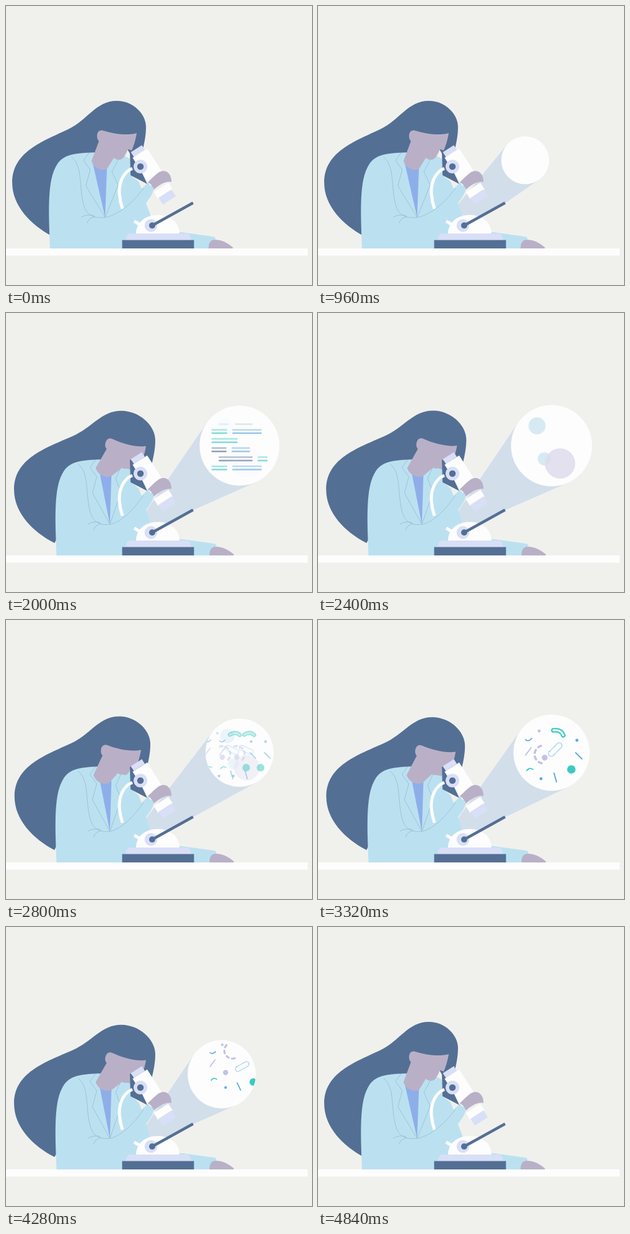
An HTML page with a canvas that plays this animation: 494x450 px, repeating every 5.04 s.

```html
<!DOCTYPE html>
<html lang="en">
<head>
<meta charset="utf-8">
<title>Microscope</title>
<style>
  html, body { margin: 0; width: 100%; height: 100%; overflow: hidden; background: #f0f1ed; }
  canvas { display: block; }
</style>
</head>
<body>
<canvas width="494" height="450"></canvas>
<script>
const ctx = document.querySelector('canvas').getContext('2d');
const LOOP = 5040, STEP = 40;
const C = {
  bg: '#f0f1ed', white: '#fdfdfd', hair: '#546f94', coat: '#bbe1f1', skin: '#b9b0c7', lilac: '#d8dff7',
  beam: '#d3deeb', shirt: '#8eaeea', seam: '#9cc3d5', teal: '#3bcac0', blue: '#5fabe0', purple: '#c2c2e8'
};

const clamp = (v, lo = 0, hi = 1) => Math.min(hi, Math.max(lo, v));
const ramp = (t, a, b) => { const p = clamp((t - a) / (b - a)); return p * p * (3 - 2 * p); };

// Monotone cubic interpolation through [time, value] keys.
function track(...keys) {
  const slope = i => keys[i] && keys[i + 1]
    ? (keys[i + 1][1] - keys[i][1]) / (keys[i + 1][0] - keys[i][0]) : 0;
  const tangent = i => {
    const a = slope(i - 1), b = slope(i);
    return a * b > 0 ? 2 * a * b / (a + b) : 0;
  };
  return t => {
    if (t <= keys[0][0]) return keys[0][1];
    const i = keys.findIndex((k, n) => keys[n + 1] && t < keys[n + 1][0]);
    if (i < 0) return keys[keys.length - 1][1];
    const [t0, v0] = keys[i], [t1, v1] = keys[i + 1];
    const d = t1 - t0, p = (t - t0) / d, q = 1 - p;
    return v0 * (1 + 2 * p) * q * q + v1 * p * p * (3 - 2 * p)
      + d * p * q * (tangent(i) * q - tangent(i + 1) * p);
  };
}

const lean = track([1120, 0], [1440, .2], [1920, 1], [4300, 1], [4840, 0]);
const nod = track([1120, 0], [1440, .56], [2000, 1], [2240, 1], [2800, .47], [3320, .75], [3800, 1], [4300, 1], [4840, 0]);
const travel = track([580, 0], [1120, .86], [1440, .98], [1600, 1], [3960, 1], [4280, .75], [4520, .41], [4780, 0]);
const radius = track([580, 0], [1120, 53], [1440, 61], [2000, 64.5], [2260, 67.5], [2800, 55], [3320, 61.5],
  [3640, 59], [3960, 60], [4280, 55], [4520, 25], [4780, 0]);

function fill(d, color) {
  ctx.fillStyle = color;
  ctx.fill(new Path2D(d));
}
function stroke(d, color, width, cap = 'butt') {
  ctx.strokeStyle = color;
  ctx.lineWidth = width;
  ctx.lineCap = cap;
  ctx.stroke(new Path2D(d));
}
function disc(x, y, r, color) {
  ctx.fillStyle = color;
  ctx.beginPath();
  ctx.arc(x, y, r, 0, 7);
  ctx.fill();
}
function box(x, y, w, h, color) {
  ctx.fillStyle = color;
  ctx.fillRect(x, y, w, h);
}
function placed(x, y, degrees, draw) {
  ctx.save();
  ctx.translate(x, y);
  ctx.rotate(degrees * Math.PI / 180);
  draw();
  ctx.restore();
}
function faded(alpha, draw) {
  if (alpha <= 0) return;
  ctx.save();
  ctx.globalAlpha *= alpha;
  draw();
  ctx.restore();
}
// Moves every coordinate pair of a path by shift(x, y).
const warp = (d, shift) => d.replace(/([\d.]+) ([\d.]+)/g, (m, x, y) => {
  const [dx, dy] = shift(+x, +y);
  return `${+x + dx} ${+y + dy}`;
});

function tangent(x, y, b, side) {
  const dx = b.x - x, dy = b.y - y, d = Math.hypot(dx, dy);
  const half = Math.asin(Math.min(1, b.r / d));
  const a = Math.atan2(dy, dx) + side * half, len = d * Math.cos(half);
  return `${x + Math.cos(a) * len} ${y + Math.sin(a) * len}`;
}

function drawBeam(b) {
  fill(`M226 320 L${tangent(226, 320, b, -1)} L${b.x} ${b.y} L${tangent(302, 318, b, 1)} L302 318 L240 351Z`, C.beam);
}

// Code rows as [start, end, color] dashes.
const rows = [
  [[-42, -4, C.teal]],
  [[-42, -21, C.hair], [-11, 15, C.blue]],
  [[-31, 19, C.hair], [29, 42, C.teal]],
  [[-42, -20, C.teal], [-10, 33, C.blue]],
  [[-31, -18, C.blue], [-6, 19, C.hair]]
];

function codeRows(t, scroll) {
  for (let i = -1; i < 20; i++) {
    const y = -21 + i * 14 - scroll;
    if (y > 43 || y < -48) continue;
    const typed = ramp(t, 1060 + i * 55, 1180 + i * 55);
    const row = i < 0 ? [[-42, -11, C.lilac]] : i < 5 ? rows[i] : rows[(i + 2) % 4];
    if (typed) faded(scroll ? clamp((y + 36) / 10) : 1, () => row.forEach(([a, b, color]) =>
      stroke(`M${a} ${y} H${a + (b - a) * typed}`, color, i < 0 ? 4 : 2.4, 'round')));
  }
}

function drawCode(t) {
  const scroll = Math.max(0, t - 1460) * .13;
  if (!scroll) return codeRows(t, 0);
  faded(.45, () => codeRows(t, scroll + 3.2));
  faded(.65, () => codeRows(t, scroll - 2));
}

function drawCells() {
  disc(-22, -30, 13, '#cfe6f3');
  disc(-11, 20, 10, '#cfe6f3');
  disc(13, 27, 23, '#dedbed');
}

function drawMicrobes(t, away) {
  const p = ramp(t, 3320, 4280), early = 1 - ramp(t, 2800, 3320);
  ctx.translate(84 * away, -72 * away);
  placed(11 + 12 * p, -33 - 12 * p, -25 * early, () => {
    stroke('M-8 -3 Q4 -5 8 5', C.teal, 7.5, 'round');
    stroke('M-8 -3 Q4 -5 8 5', C.white, 3, 'round');
  });
  placed(6 + 10 * p, -5 + 9 * p, -45 + 16 * p + 70 * early, () => {
    ctx.setLineDash([1.2, 1.2]);
    stroke('M-9 -4.5 H9 A4.5 4.5 0 0 1 9 4.5 H-9 A4.5 4.5 0 0 1 -9 -4.5Z', C.blue, 1.4);
  });
  placed(-12 + 11 * p, 3 - 28 * p, -30 * p + 150 * early, () => {
    ctx.setLineDash([5, 6]);
    stroke('M-4 14 A14.5 14.5 0 0 1 -5 -14', C.purple, 3.6, 'round');
  });
  disc(-11 - 3 * p, 8 + 7 * p, 4.7, C.purple);
  disc(32 + 4 * p, 27 + 5 * p, 6.8, C.teal);
  disc(-20, -35, 2.4, C.purple);
  disc(41, -20, 2.4, C.blue);
  disc(-17 + 3 * p, 42, 2.4, C.blue);
  stroke('M39 0 L49 10', C.blue, 2, 'round');
  placed(6 + 4 * p, 40, -10 * p, () => stroke('M-2 -7 L2 7', C.blue, 2, 'round'));
  stroke('M-42 4 L-33 -8', C.purple, 2, 'round');
  stroke('M-42 -21 Q-37 -17 -32 -23', C.blue, 1.8, 'round');
  stroke('M-40 29 Q-36 23 -30 27', C.teal, 1.8, 'round');
}

function drawBubble(t, b) {
  disc(b.x, b.y, b.r, C.white);
  ctx.save();
  ctx.beginPath();
  ctx.arc(b.x, b.y, b.r, 0, 7);
  ctx.clip();
  ctx.translate(b.x, b.y);
  const scale = t < 4000 ? b.r / 61.5 : Math.min(b.r / 61.5, .9 + .1 * ramp(4280 - t, 0, 280));
  ctx.scale(scale, scale);
  if (t < 2280) faded(1 - ramp(t, 2080, 2280), () => drawCode(t));
  faded(.8 * ramp(t, 1920, 2320) * (1 - ramp(t, 2680, 2920)), drawCells);
  if (t > 2600) {
    // The slide sweeps in from the left with a trail, then settles.
    const sweep = t <= 2800 ? 6 - (2800 - t) * .65 : 6 * (1 - ramp(t, 2800, 3100));
    const trail = t <= 2800 ? 26 : 0;
    faded(trail ? .5 : 1, () => { ctx.translate(sweep, 0); drawMicrobes(t, 1 - b.u); });
    if (trail) faded(.5, () => { ctx.translate(sweep - trail, 0); drawMicrobes(t, 0); });
  }
  ctx.restore();
}

function drawWoman(k, h) {
  const tilt = x => h * clamp(2 + (x - 155) * .14, 0, 10);
  const hair = x => {
    const w = clamp((x - 60) / 125);
    return [(4.5 * k - 1.5 * h) * (1 - w) + 15 * h * w, tilt(x)];
  };
  const head = (x, y) => {
    const w = clamp(.5 + (262 - y) / 80 + (x - 163) / 60, .45, 1);
    return [15 * h * w, y > 248.5 ? 0 : tilt(x)];
  };
  const coat = x => [10.5 * k * clamp((215 - x) / 75), 0];

  fill(warp('M74 371 C40 353 10 322 10 285 C10 235 60 218 100 199 C132 184 145 153 179 153 C205 153 226 174 226 195 C226 210 223 222 221 231 L203 243 L196 231 L160 262 L110 300Z', hair), C.hair);
  fill(warp('M71 391 C70 350 65 287 80 260 C88 244 100 239 125 237 C150 235 190 236 200 247 L201 273 L214 283 L219 295 L230 284 C237 287 240 292 238 298 C236 305 230 312 226 318 L233 336 L242 391Z', coat), C.coat);
  placed(1.5 * k, 0, 0, () => {
    fill('M270 364 L284 365 L335 372 Q339 373 338 378 L330 391 H270Z', C.coat);
    fill('M327 391 C327 382 330 377 337 377 C350 377 358 383 366 389 Q367 391 365 391Z', C.skin);
  });
  fill(warp('M139 249 L163 260 L160 341Z', coat), C.shirt);
  const seams = [
    'M106 244 C126 259 116 300 128 328 C135 341 148 342 160 341 C182 337 205 317 222 294',
    'M134 237 L125 249 L136 264 L129 290 L160 341',
    'M181 248 L171 267 L181 289 L160 341',
    'M121 341 Q131 335 142 338',
    'M131 350 Q134 341 144 340'
  ];
  seams.forEach(d => stroke(warp(d, coat), C.seam, 1));
  fill(warp('M147 210 C147 203 151 199 157 201 C175 207 198 209 211 205 C209 217 206 226 203 233 L197 231 C194 237 192 243 187 247 C182 249 178 248 174 245 L163 263 C152 267 141 260 138 250 L150 218 C148 216 147 213 147 210Z', head), C.skin);
}

function drawMicroscope() {
  fill('M200 236 L201 273 L228 287 L206 240Z', C.hair);
  stroke('M204 262 C189 268 182 285 183 303 C184 314 186 321 188 327', C.white, 5);
  placed(211, 231, -32.6, () => {
    box(-13, 8, 28, 54, C.white);
    box(-10.5, -1, 21, 9, C.lilac);
    box(-14, 73, 28, 13, C.white);
    box(-12.5, 85, 25, 13, C.lilac);
  });
  disc(217, 259, 11, C.lilac);
  disc(217, 259, 5.3, C.hair);
  fill('M229 284 C238 276 245 267 253 266 C262 265 268 275 267 284 C258 282 248 288 239 296 C237 291 234 287 229 284Z', C.skin);

  stroke('M207 347 L217 353', C.white, 5);
  fill('M210 367 C210 348 226 337 245 337 C264 337 280 349 280 367Z', C.white);
  fill('M193 378 Q194 367 201 367 H292 Q298 367 299 378Z', C.lilac);
  box(187.5, 377.5, 116, 14, C.hair);
  disc(234, 354, 10.3, C.lilac);
  stroke('M236 354 L302 317.5', C.hair, 4.5);
  disc(236, 354, 5, C.hair);
}

function render(now) {
  const t = Math.floor(now % LOOP / STEP) * STEP;
  const u = travel(t);
  const bubble = { u, x: 262 + 115 * u, y: 308 - 94 * u, r: radius(t) };
  const open = t >= 600 && bubble.r > .3;
  box(0, 0, 494, 450, C.bg);
  if (open) faded(Math.min(1, bubble.r / 8), () => drawBeam(bubble));
  drawWoman(lean(t), nod(t));
  if (open) drawBubble(t, bubble);
  drawMicroscope();
  box(0, 391, 487, 11.5, C.white);
}

const start = performance.now();
function loop() {
  render(performance.now() - start);
  requestAnimationFrame(loop);
}
loop();
</script>
</body>
</html>
```
